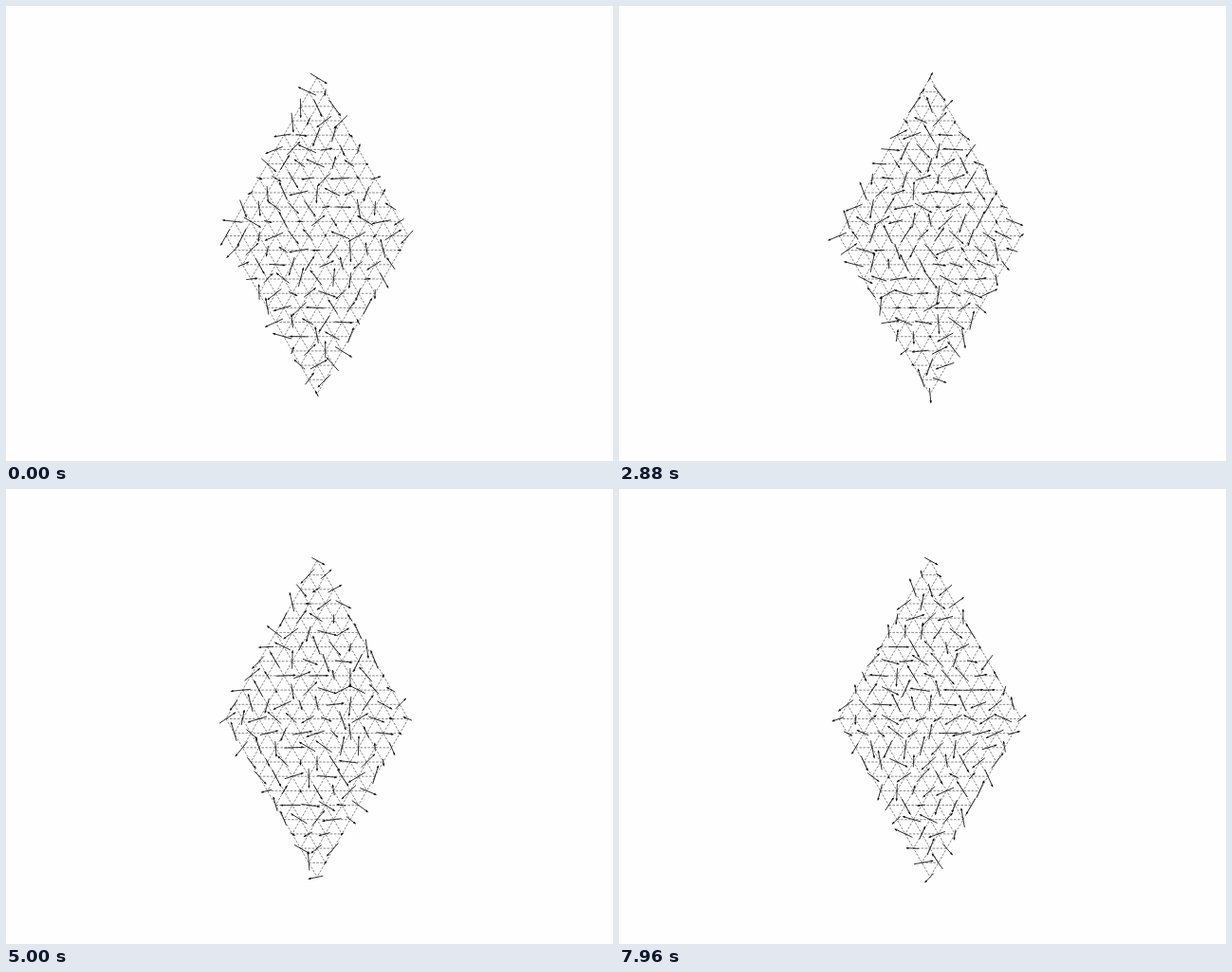
An HTML page with a canvas for the animation above (8 s loop, 640x480 px).

```html
<!DOCTYPE html>
<html lang="en">
<head>
<meta charset="utf-8">
<title>Spins on a triangular lattice</title>
<style>
  html, body { margin: 0; width: 100%; height: 100%; overflow: hidden; background: #fefefe; }
  canvas { display: block; }
</style>
</head>
<body>
<canvas id="stage" width="640" height="480"></canvas>
<script>
const ctx = document.getElementById('stage').getContext('2d');
const LOOP = 8000, STEP = 40;
const N = 12, DX = 8.73, DY = 15.18, TOP = { x: 328, y: 75.5 };
const TAIL = 8.5, TIP = 13;
const TAU = Math.PI * 2;

let seed = 20117;
function random() {
  seed = (seed * 1664525 + 1013904223) >>> 0;
  return seed / 4294967296;
}

const site = (i, j) => ({ x: TOP.x + (i - j) * DX, y: TOP.y + (i + j) * DY });

// A component of a wandering vector: three waves of unrelated period.
function makeWaves() {
  return Array.from({ length: 3 }, () => ({
    rate: TAU / (650 + 1500 * random()),
    phase: TAU * random()
  }));
}

const waveSum = (waves, t) =>
  waves.reduce((sum, w) => sum + Math.sin(w.rate * t + w.phase), 0);

// A unit vector wandering over the sphere, seen along its z axis.
function makePose() {
  const axes = [makeWaves(), makeWaves(), makeWaves()];
  return t => {
    const [x, y, z] = axes.map(waves => waveSum(waves, t));
    const size = Math.hypot(x, y, z) || 1;
    return { angle: Math.atan2(y, x), length: Math.hypot(x, y) / size };
  };
}

const spins = [];
for (let i = 0; i < N; i++) {
  for (let j = 0; j < N; j++) spins.push({ ...site(i, j), pose: makePose() });
}

function line(a, b) {
  ctx.beginPath();
  ctx.moveTo(a.x, a.y);
  ctx.lineTo(b.x, b.y);
  ctx.stroke();
}

function drawLattice() {
  ctx.strokeStyle = '#3a3a3a';
  ctx.lineWidth = 0.6;
  ctx.setLineDash([2.6, 1.4]);
  for (let k = 0; k < N; k++) {
    line(site(k, 0), site(k, N - 1));
    line(site(0, k), site(N - 1, k));
  }
  for (let sum = 1; sum < 2 * N - 2; sum++) {
    const low = Math.max(0, sum - N + 1), high = Math.min(N - 1, sum);
    line(site(low, sum - low), site(high, sum - high));
  }
  ctx.setLineDash([]);
}

function drawSpin({ x, y, pose }, t) {
  const { angle, length } = pose(t);
  const tip = TIP * length;
  ctx.save();
  ctx.translate(x, y);
  ctx.rotate(angle);
  line({ x: -TAIL * length, y: 0 }, { x: tip - 1, y: 0 });
  ctx.beginPath();
  ctx.moveTo(tip, 0);
  ctx.lineTo(tip - 3.2, -1.15);
  ctx.lineTo(tip - 3.2, 1.15);
  ctx.fill();
  ctx.restore();
}

function draw(t) {
  ctx.fillStyle = '#fefefe';
  ctx.fillRect(0, 0, 640, 480);
  drawLattice();
  ctx.strokeStyle = ctx.fillStyle = '#111';
  ctx.lineWidth = 0.8;
  spins.forEach(spin => drawSpin(spin, t));
}

const start = performance.now();
function tick() {
  const t = (performance.now() - start) % LOOP;
  draw(Math.floor(t / STEP) * STEP);
  requestAnimationFrame(tick);
}
tick();
</script>
</body>
</html>
```
